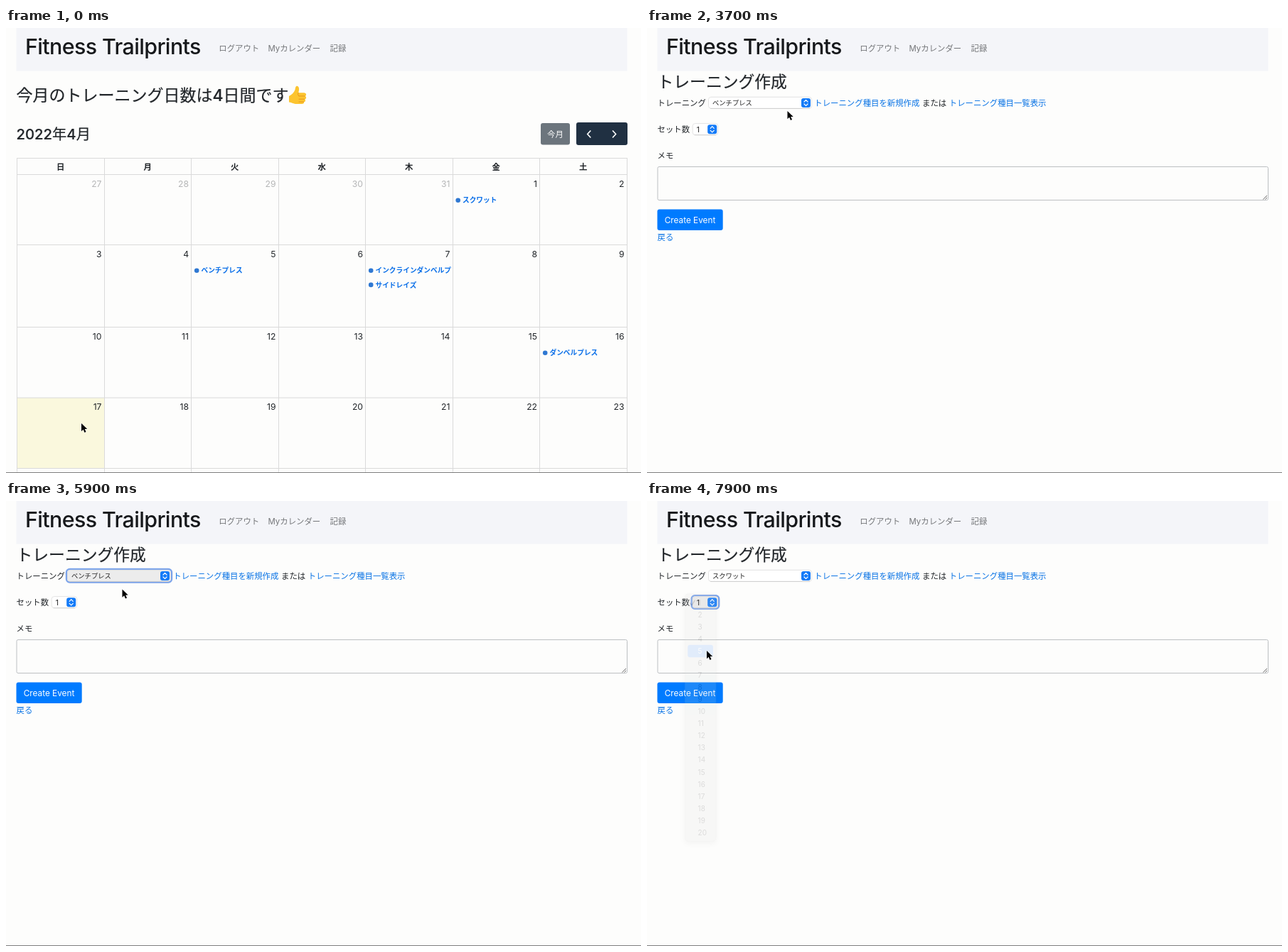
Animation of 893 by 627 pixels, one loop 8000 ms. Source, as an HTML page:

```html
<!DOCTYPE html>
<html lang="ja">
<head>
<meta charset="utf-8">
<title>Training calendar</title>
<style>
  html, body { margin: 0; width: 100%; height: 100%; overflow: hidden; background: #fdfdfc; }
  svg { display: block; width: 893px; height: 627px; }
  text { font-family: Inter, "Noto Sans CJK JP", "Noto Sans CJK", sans-serif; white-space: pre; }
  .head { font-weight: 500; stroke: #212529; stroke-width: .2; }
  .brand { font-weight: 500; letter-spacing: -.02em; }
  .bold { font-weight: 700; }
  .menu { filter: drop-shadow(0 3px 5px rgba(0, 0, 0, .28)); }
</style>
</head>
<body>
<svg id="stage" viewBox="0 0 893 627"></svg>
<script>
const NS = 'http://www.w3.org/2000/svg';
const LOOP = 8000, STEP = 100;
const INK = '#212529', LINK = '#0b74e5', BLUE = '#007bff';
const stage = document.getElementById('stage');

function add(parent, tag, attrs = {}, content) {
  const el = document.createElementNS(NS, tag);
  for (const key in attrs) el.setAttribute(key, attrs[key]);
  if (content !== undefined) el.textContent = content;
  parent.append(el);
  return el;
}
const group = (parent, attrs) => add(parent, 'g', attrs);
const rect = (parent, x, y, width, height, fill, attrs) =>
  add(parent, 'rect', { x, y, width, height, fill, ...attrs });
const text = (parent, x, y, size, content, fill = INK, attrs) =>
  add(parent, 'text', { x, y, 'font-size': size, fill, ...attrs }, content);
const line = (parent, d, stroke, width = 1, attrs) =>
  add(parent, 'path', { d, stroke, 'stroke-width': width, fill: 'none', ...attrs });
const show = (el, on) => el.setAttribute('visibility', on ? 'visible' : 'hidden');

const defs = add(stage, 'defs');
const tint = add(defs, 'linearGradient', {
  id: 'tint', gradientUnits: 'userSpaceOnUse', x1: 0, x2: 0, y1: 131, y2: 479
});
[[0, '#dcdada'], [.29, '#dcdada'], [.35, '#c9d9da'], [.4, '#b9d0da'], [.44, '#c3d8da'],
 [.5, '#dadada'], [1, '#dcdada']].forEach(([offset, color]) =>
  add(tint, 'stop', { offset, 'stop-color': color }));

rect(stage, 0, 0, 893, 627, '#fdfdfc');
const calendar = group(stage);
const form = group(stage);

// Navigation bar
rect(stage, 14.5, 0, 859, 60.5, '#f4f5f9');
text(stage, 27, 37, 30.4, 'Fitness Trailprints', '#16181b', { class: 'brand' });
text(stage, 299.3, 33, 11.4, 'ログアウト', '#75777a');
text(stage, 368.5, 33, 11.4, 'Myカレンダー', '#75777a');
text(stage, 455.6, 33, 11.4, '記録', '#75777a');

function thumb(parent) {
  add(parent, 'path', {
    d: 'M398 96C402 94 405 91 406.5 87C407 84 407.3 81.3 409.6 81.7C412.6 82.3 412.6 87 411.2 91.3' +
       'H419C422.6 91.6 423 95 420.8 96C423 97.4 422.4 100 420.2 100.4C421.8 102 421 104 419 104.2' +
       'C419.6 106 418 107 416 107H409C404 107 402 104.6 398 104.4Z',
    fill: '#fcc42f'
  });
  line(parent, 'M412 95.9H420M412 100.2H419.6M412 104H418.6M411.2 91.3C410 93 410.5 94.5 412 95.9',
    '#e58f1c', .9, { 'stroke-linecap': 'round' });
}

function buildCalendar(g) {
  const left = 15.5, col = 122.5;
  const tops = [206.5, 305.5, 421.5, 521, 620.5];
  text(g, 14.5, 102.5, 23, '今月のトレーニング日数は4日間です', INK, { class: 'head' });
  thumb(g);
  text(g, 14.5, 157, 20.3, '2022年4月', INK, { class: 'head' });

  rect(g, 752, 134, 41, 30.5, '#6c757d', { rx: 3 });
  text(g, 761, 153.5, 11.4, '今月', '#fff');
  rect(g, 802, 133, 72, 32, '#203042', { rx: 3 });
  line(g, 'M822.3 144.5l-4.6 5 4.6 5M853 144.5l4.6 5-4.6 5', '#fff', 1.6);

  rect(g, left, 521, col, 99.5, '#faf8dd');
  let grid = `M15 183.5H873.5M15 ${tops.join('H873.5M15 ')}H873.5`;
  for (let i = 0; i < 8; i++) grid += `M${Math.round(left + i * col - .5) + .5} 183V626`;
  line(g, grid, '#dadada');

  [...'日月火水木金土'].forEach((day, i) =>
    text(g, left + (i + .5) * col, 199.5, 11.4, day, INK, { class: 'bold', 'text-anchor': 'middle' }));
  for (let i = 0; i < 28; i++) {
    const old = i < 5;
    text(g, left + (i % 7 + 1) * col - 3.5, tops[i / 7 | 0] + 17.3, 12.2,
      old ? 27 + i : i - 4, old ? '#b5b6b7' : INK, { 'text-anchor': 'end' });
  }

  const clip = add(defs, 'clipPath', { id: 'thursday' });
  rect(clip, 505, 300, 122, 80, '#000');
  [[5, 0, 0, 'スクワット'], [2, 1, 0, 'ベンチプレス'], [4, 1, 0, 'インクラインダンベルプ'],
   [4, 1, 1, 'サイドレイズ'], [6, 2, 0, 'ダンベルプレス']].forEach(([c, row, n, name]) => {
    const x = left + c * col, y = tops[row] + 36.2 + n * 20.2;
    add(g, 'circle', { cx: x + 7.7, cy: y, r: 3.3, fill: '#2f78d2' });
    text(g, x + 14, y + 3.6, 9.7, name, '#0a6fe8',
      { class: 'bold', ...(c === 4 && { 'clip-path': 'url(#thursday)' }) });
  });
}

function buildSelect(parent, x, y, width, value, size) {
  const g = group(parent);
  const ring = rect(g, x - 1, y - 1, width + 2, 18.5, 'none',
    { rx: 4.5, stroke: '#7ba3ea', 'stroke-width': 2.4 });
  const box = rect(g, x + .5, y + .3, width - 1, 16, '#fff',
    { rx: 3.5, stroke: '#dedede', 'stroke-width': .8 });
  line(g, `M${x + 3} ${y + 16.5}H${x + width - 3}`, '#c6c6c6', .7);
  const label = text(g, x + 6, y + 12.3, size, value, '#222');
  const bx = x + width - 15;
  rect(g, bx, y + 2, 13, 13, '#147bf8', { rx: 3 });
  line(g, `M${bx + 4} ${y + 7}l2.5-2.6 2.5 2.6m0 3l-2.5 2.6-2.5-2.6`, '#fff', 1.2,
    { 'stroke-linecap': 'round', 'stroke-linejoin': 'round' });
  return {
    label,
    update(focused, pressed) {
      show(ring, focused);
      box.setAttribute('fill', pressed ? '#ececec' : '#fff');
    }
  };
}

function buildForm(g) {
  text(g, 14.5, 84, 22.8, 'トレーニング作成', INK, { class: 'head' });
  text(g, 14.5, 109.7, 11.4, 'トレーニング');
  text(g, 235.3, 109.7, 11.4, 'トレーニング種目を新規作成', LINK);
  text(g, 387, 109.7, 11.4, 'または');
  text(g, 424.8, 109.7, 11.4, 'トレーニング種目一覧表示', LINK);
  text(g, 14.5, 147, 11.4, 'セット数');
  text(g, 14.5, 184.2, 11.4, 'メモ');
  rect(g, 15, 195.5, 858.5, 47, '#fdfdfc', { rx: 2, stroke: '#bcbfc2' });
  line(g, 'M866.5 241.5l5.5-5.5M869.5 241.5l2.5-2.5', '#555', .9);
  rect(g, 14.5, 255.5, 92.2, 29.5, BLUE, { rx: 3 });
  text(g, 24.7, 274.8, 11.8, 'Create Event', '#fff');
  text(g, 14.5, 298.7, 11.4, '戻る', LINK);
}

function buildMenu(items, { x, y, width, height, first, textX, size, fill }) {
  const g = group(stage, { class: 'menu' });
  rect(g, x, y, width, height, fill, { rx: 4.5, stroke: '#bdbdbd', 'stroke-width': .6 });
  const bar = rect(g, x + 4, 0, width - 8, 17.5, '#4a90fa', { rx: 3 });
  const check = line(g, `M${textX - 11.2} ${first + .5}l2.6 3 4.2-6.6`, '#222', 1.5,
    { 'stroke-linecap': 'round', 'stroke-linejoin': 'round' });
  const labels = items.map((item, i) => text(g, textX, first + i * 17.05 + 3.5, size, item));
  return (opacity, pointerY) => {
    show(g, opacity > 0);
    g.setAttribute('opacity', opacity);
    const active = Math.max(0, Math.min(items.length - 1, Math.round((pointerY - first) / 17.05)));
    bar.setAttribute('y', first + active * 17.05 - 8.8);
    check.setAttribute('stroke', active ? '#222' : '#fff');
    labels.forEach((el, i) => el.setAttribute('fill', i === active ? '#fff' : '#222'));
  };
}

buildCalendar(calendar);
buildForm(form);
const training = buildSelect(form, 86, 97, 146, 'ベンチプレス', 9.3);
const sets = buildSelect(form, 63.7, 134.3, 36.5, '1', 10.4);
const trainingMenu = buildMenu(
  ['ベンチプレス', 'スクワット', 'ダンベルプレス', 'ダンベルプレス', 'サイドレイズ', 'インクラインダンベルプレス'],
  { x: 76.7, y: 93.7, width: 152.6, height: 110.3, first: 106, textX: 95.3, size: 9.25, fill: '#dadada' });
const setsMenu = buildMenu(
  Array.from({ length: 20 }, (_, i) => i + 1),
  { x: 53.3, y: 130.8, width: 43.6, height: 348.5, first: 143.3, textX: 71.6, size: 10, fill: 'url(#tint)' });

rect(stage, 0, 626, 893, 1, '#7d7d7d');
const cursor = add(stage, 'path', {
  d: 'M0 0V11.2L2.6 8.8L4.5 13L6.5 12.1L4.7 8H8.2Z',
  fill: '#000', stroke: '#fff', 'stroke-width': 1, 'paint-order': 'stroke'
});

// Pointer stops: time, x, y
const path = [
  [0, 106, 557], [300, 105, 558], [2500, 105, 558], [3300, 199, 124], [3700, 197.5, 117],
  [4100, 193, 106], [4600, 192, 106], [5200, 184.5, 122], [5600, 184, 122], [5900, 163.5, 124.5],
  [6500, 90, 142], [6700, 89, 143], [7100, 86, 181], [7500, 84.5, 208], [7700, 84, 211], [8000, 84, 211]
];

function pointer(t) {
  const i = path.findIndex(p => p[0] > t);
  const [t0, x0, y0] = path[i - 1], [t1, x1, y1] = path[i];
  const k = (t - t0) / (t1 - t0), e = k * k * (3 - 2 * k);
  return [x0 + (x1 - x0) * e, y0 + (y1 - y0) * e];
}

const menuOpacity = (t, open, fade) => t < open || t > fade ? 0 : t === fade ? .15 : 1;

function render(t) {
  const [x, y] = pointer(t);
  cursor.setAttribute('transform', `translate(${x} ${y})`);
  const onForm = t >= 2000;
  calendar.style.display = onForm ? 'none' : '';
  form.style.display = onForm ? '' : 'none';
  training.label.textContent = t < 6000 ? 'ベンチプレス' : 'スクワット';
  training.update(t >= 4200 && t < 6600, t >= 4200 && t < 6000);
  sets.update(t >= 6600, t >= 6600);
  trainingMenu(menuOpacity(t, 4300, 5800), t < 5600 ? y : 122);
  setsMenu(menuOpacity(t, 6700, 7900), y);
}

function tick() {
  render(Math.floor(performance.now() % LOOP / STEP) * STEP);
  requestAnimationFrame(tick);
}
tick();
</script>
</body>
</html>
```
